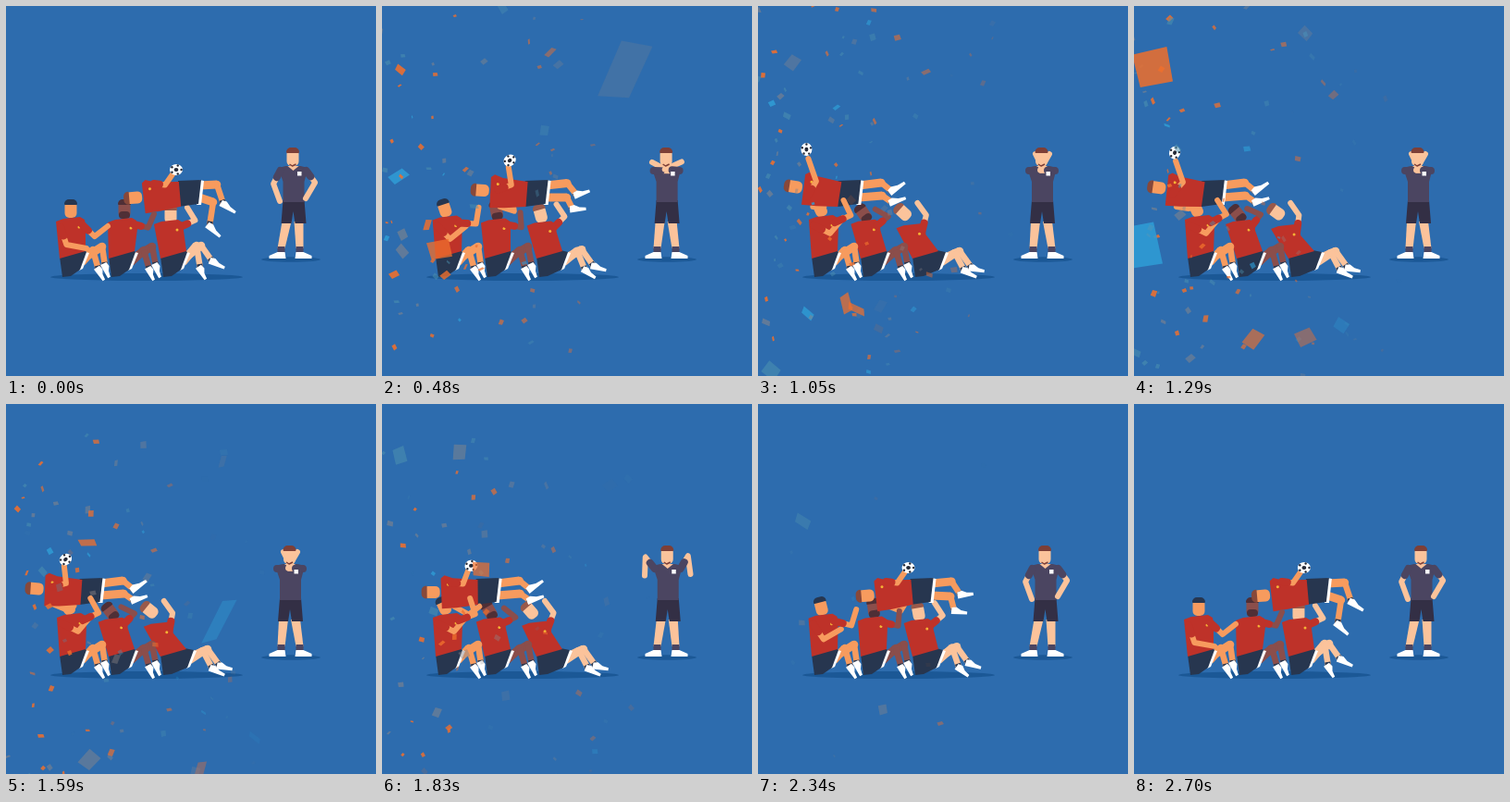
Animation, 400 px wide and 400 px high, one loop 2730 ms. Source, as an HTML page with a canvas:

```html
<!DOCTYPE html>
<html lang="en">
<head>
<meta charset="utf-8">
<title>Team celebration</title>
<style>
  html, body { margin: 0; width: 100%; height: 100%; overflow: hidden; background: #2d6cae; }
  canvas { display: block; width: 400px; height: 400px; }
</style>
</head>
<body>
<canvas id="stage" width="400" height="400"></canvas>
<script>
const ctx = document.getElementById('stage').getContext('2d');
const LOOP = 2730, STEP = 30;
const RED = '#be3229', NAVY = '#27364f', WHITE = '#fff', SHADE = '#1b5896';
const ORANGE = '#f79b5e', PALE = '#fbc39b', BROWN = '#8b4e4b';
const PURPLE = '#4b4561', DARK = '#332f45', YELLOW = '#f5b335', MAROON = '#7d3f37';

const mix = (a, b, k) => a.map((v, i) => v + (b[i] - v) * k);
const ease = (t, from, to) => {
  const u = Math.max(0, Math.min(1, (t - from) / (to - from)));
  return u * u * (3 - 2 * u);
};

function poly(color, ...p) {
  ctx.fillStyle = color;
  ctx.beginPath();
  for (let i = 0; i < p.length; i += 2) ctx.lineTo(p[i], p[i + 1]);
  ctx.fill();
}
function line(color, width, ...p) {
  ctx.strokeStyle = color;
  ctx.lineWidth = width;
  ctx.beginPath();
  for (let i = 0; i < p.length; i += 2) ctx.lineTo(p[i], p[i + 1]);
  ctx.stroke();
}
function oval(color, x, y, rx, ry = rx) {
  ctx.fillStyle = color;
  ctx.beginPath();
  ctx.ellipse(x, y, rx, ry, 0, 0, 7);
  ctx.fill();
}
function box(color, x, y, w, h, r = 0) {
  ctx.fillStyle = color;
  ctx.beginPath();
  ctx.roundRect(x, y, w, h, r);
  ctx.fill();
}
function placed(x, y, degrees, draw) {
  ctx.save();
  ctx.translate(x, y);
  ctx.rotate(degrees * Math.PI / 180);
  draw();
  ctx.restore();
}

function head(x, y, angle, skin, hair, beard) {
  placed(x, y, angle, () => {
    box(skin, -6.5, -9, 13, 18, 5);
    if (beard) box(hair, -6, 2, 12, 8, 4);
    box(hair, -7, -11, 14, 6, [5, 5, 1, 1]);
  });
}
// The elbow follows from the shoulder, the hand and both arm lengths.
function arm(skin, sleeve, sx, sy, hx, hy, upper, lower, side) {
  const reach = Math.hypot(hx - sx, hy - sy);
  const d = Math.max(Math.abs(upper - lower) + .1, Math.min(upper + lower, reach));
  const angle = Math.atan2(hy - sy, hx - sx) +
    side * Math.acos((upper ** 2 + d * d - lower ** 2) / (2 * upper * d));
  const dx = upper * Math.cos(angle), dy = upper * Math.sin(angle);
  ctx.lineCap = 'round';
  line(skin, 6, sx, sy, sx + dx, sy + dy, hx, hy);
  line(sleeve, 8, sx, sy, sx + dx * .5, sy + dy * .5);
  ctx.lineCap = 'butt';
}
function leg(skin, hx, hy, [kx, ky, ax, ay, tx, ty]) {
  line(skin, 9, hx, hy, kx, ky);
  oval(skin, kx, ky, 4.3);
  line(skin, 6.5, kx, ky, ax, ay);
  line(NAVY, 6, kx + (ax - kx) * .8, ky + (ay - ky) * .8, ax, ay);
  const len = Math.hypot(tx - ax, ty - ay);
  placed(ax, ay, Math.atan2(ty - ay, tx - ax) * 180 / Math.PI, () =>
    poly(WHITE, -3, -3, 2, -4, len * .6, -1, len + 2, 0, len + 2, 3, -3, 4));
}

function seated(man, [sx, sy, hx, hy, angle], near, far, thigh) {
  const { hip, skin, hair, beard } = man, end = hip + thigh;
  leg(skin, end - 4, 274, far);
  leg(skin, end - 4, 277, near);
  poly(WHITE, end, 266, end + 4, 267, end - 3, 284, end - 7, 286);
  poly(NAVY, hip, 271, hip + 26, 264, end + 1, 266, end - 6, 285, hip + 12, 292, hip + 3, 293);
  head(hx, hy, angle, skin, hair, beard);
  poly(RED, sx, sy, sx + 8, sy - 3, sx + 26, sy - 5, sx + 31, sy - 2, sx + 32, sy + 7, hip + 28, 265, hip, 273);
  oval(YELLOW, sx + 25, sy + 6, 1.5);
}

const left = { hip: 58, skin: ORANGE, hair: NAVY };
const middle = { hip: 111, skin: BROWN, hair: '#4f2f36', beard: true };
const right = { hip: 167, skin: PALE, hair: '#99594a' };

function ball(x, y, turn) {
  placed(x, y, turn, () => {
    oval(WHITE, 0, 0, 7, 6);
    oval('#242936', 0, 0, 2.4, 2);
    for (let a = 0; a < 6; a += Math.PI * .4)
      oval('#242936', 5.6 * Math.cos(a), 4.8 * Math.sin(a), 1.2);
  });
}

// Lying player, carried to the left and back
function lifted(roll, stretch, lift) {
  const w = 187 - 114 * roll, hem = w + 25;
  const legAt = (from, to) => mix(from, to, stretch).map((v, i) => i % 2 ? v : v + hem);
  const back = stretch * (1 - lift);
  leg(ORANGE, hem - 3, 207, legAt([12, 212, 8, 238, 19, 247], [22, 205, 32, 212, 45, 207]));
  leg(ORANGE, hem - 3, 194, legAt([16, 193, 23, 214, 35, 221], [21, 191, 32, 200, 44, 191]));
  poly(WHITE, hem - 3, 188, hem + 2, 189, hem - 1, 215, hem - 6, 215);
  poly(NAVY, w - 1, 189, hem - 1, 188, hem - 4, 214, w - 1, 217);
  ctx.lineCap = 'round';
  line(ORANGE, 6, w - 28, 217, w - 16 + 8 * back, 217 + 12 * back, w - 26 + 32 * back, 217 + 2 * back);
  ctx.lineCap = 'butt';
  placed(w, 203, 14 * Math.sqrt(lift) - 5, () => {
    head(-49, 0, -90, ORANGE, '#87483a');
    poly(RED, -39, -15, -35, -18, -26, -15, 1, -13, 1, 14, -22, 17, -38, 18);
    oval(YELLOW, -31, -8, 1.5);
  });
  const bx = w - 3 - 32 * lift, by = 177 - 22 * lift;
  arm(ORANGE, RED, w - 27 - 7 * lift, 192 + 14 * lift, bx - 4 + 6 * lift, by + 5 + 5 * lift,
    12 + 7 * lift, 14 + 12 * lift, 1);
  ball(bx, by, -90 * lift);
}

function team(t) {
  const roll = (1 - Math.cos(2 * Math.PI * t / LOOP)) / 2;
  const stretch = 1 - (1 - roll) ** 4;
  const lift = Math.sin(Math.PI * Math.min(1, t / 2040)) ** 2;

  oval(SHADE, 152, 293, 104, 4);
  const a = mix([54, 233, 70, 220, 0], [55, 231, 67, 219, -25], stretch);
  const b = mix([110, 234, 128, 220, 0], [99, 236, 112, 225, -40], roll);
  const c = mix([160, 236, 178, 226, 0], [148, 241, 154, 223, -55], roll);

  arm(PALE, RED, c[0] + 28, c[1] + 3, 196 - 27 * roll, 218 - 5 * stretch, 18, 16, 1);
  seated(right, c,
    mix([206, 259, 210, 284, 216, 293], [213, 267, 223, 286, 235, 291], stretch),
    mix([211, 259, 223, 276, 235, 281], [218, 265, 231, 283, 243, 285], stretch), 28 + 7 * stretch);
  seated(middle, b, [149, 264, 155, 285, 160, 294], [158, 260, 162, 281, 167, 291], 28);
  seated(left, a, [94, 264, 100, 285, 106, 294], [104, 260, 107, 281, 112, 291], 28);
  arm(ORANGE, RED, a[0] + 5, a[1] + 6, ...mix([87, 262], [92, 229], stretch), 20, 22, 1);
  lifted(roll, stretch, lift);
  arm(BROWN, RED, b[0] + 28, b[1] + 2, 160 - 38 * roll, 225 - 6 * roll, 16, 16, 1);
  arm(ORANGE, RED, a[0] + 28, a[1] + 3, 110 - 20 * roll, 238 - 28 * stretch, 19, 18, 1);
}

function coach(t) {
  const raise = ease(t, 150, 600) - ease(t, 1620, 2040);
  const c = 310.5 - 3.5 * raise, swing = 14 * Math.sin(Math.PI * raise);
  oval(SHADE, 308, 274, 32, 2.8);
  for (const side of [-1, 1]) {
    const foot = 307.5 + 10 * side, hip = c - .5 + 6.5 * side;
    poly(PALE, hip - 5, 233, hip + 5, 233, foot + 4, 262, foot - 4, 262);
    box(PURPLE, foot - 4, 260, 8, 7);
    poly(WHITE, foot - 4 * side, 266, foot + 4 * side, 266, foot + 13 * side, 270, foot + 13 * side, 273, foot - 5 * side, 273);
  }
  poly(DARK, c - 11, 210, c + 12, 210, c + 14, 235, c + 2, 235, c, 222, c - 2, 235, c - 13, 235);
  poly(PURPLE, c - 16, 175, c - 8, 173, c + 8, 173, c + 16, 175, c + 12, 190, c + 12, 212, c - 11, 212, c - 11, 190);
  poly(PALE, c - 6, 173, c + 6, 173, c, 178);
  arm(PALE, PURPLE, c - 14, 178, ...mix([296 - swing, 211], [300 - swing, 160], raise), 16, 20, 1);
  arm(PALE, PURPLE, c + 14, 178, ...mix([324 + swing, 208], [315 + swing, 160], raise), 16, 20, -1);
  head(c - .5, 164, 0, PALE, MAROON);
  line(MAROON, 1.5, c - 4, 171, c - 1, 173, c + 3, 171);
  box(WHITE, c + 4.5, 179, 4.5, 4.5);
}

const PAPER = ['#ee6f2d', '#8d8788', '#4d92b0', '#2f9bd4'];
function random(seed) {
  return () => {
    seed = (seed * 16807) % 2147483647;
    return seed / 2147483647;
  };
}
const rnd = random(4711);
const bits = Array.from({ length: 230 }, () => ({
  start: 20 + 1730 * rnd() ** 1.2, life: 600 + 330 * rnd(),
  reach: 15 + 265 * rnd() ** 1.2, y: -70 + 410 * rnd(), fall: .05 + .18 * rnd(),
  size: 1.6 + 2.4 * rnd() + 9 * rnd() ** 12, color: Math.floor(3.3 * rnd() ** 1.6),
  turn: 360 * rnd(), spin: .5 * (rnd() - .5)
}));
// Paper passing close by: time, x, y, size, paper colour, width ratio
const near = [
  [480, 62, 263, 14, 0, .8], [480, 262, 70, 38, 1, .5], [1290, 20, 66, 22, 0, 1],
  [1290, -2, 260, 33, 3, .8], [1590, 230, 235, 30, 3, .25], [2040, 72, 288, 25, 2, .5]];

function paper(x, y, size, turn, ratio, color, alpha) {
  ctx.globalAlpha = Math.max(0, Math.min(1, alpha)) * (color % 3 ? .55 : .9);
  placed(x, y, turn, () =>
    poly(PAPER[color], -size, -size * ratio * .6, size * .7, -size * ratio, size, size * ratio * .7, -size * .6, size * ratio));
  ctx.globalAlpha = 1;
}
const fade = x => 1 - Math.max(0, x / 300) ** 1.5;
function confetti(t) {
  for (const b of bits) {
    const age = t - b.start;
    if (age < 0 || age > b.life) continue;
    const x = -15 + b.reach * (1 - Math.exp(-age / 150)) + age * .03;
    paper(x, b.y + b.start * .04 + age * b.fall, b.size, b.turn + age * b.spin,
      .35 + .5 * Math.abs(Math.sin(b.turn + age / 190)), b.color,
      fade(x) * Math.min(1, (b.life - age) / 150));
  }
  for (const [time, x, y, size, color, ratio] of near) {
    const d = t - time;
    paper(x + d * .12, y + d * .28, size, d * .15 - 60 * (ratio < .6), ratio, color,
      (1 - x / 420) * (1 - Math.abs(d) / 150));
  }
}

function draw() {
  const t = Math.floor(performance.now() % LOOP / STEP) * STEP;
  ctx.fillStyle = '#2d6cae';
  ctx.fillRect(0, 0, 400, 400);
  ctx.lineJoin = 'round';
  coach(t);
  team(t);
  confetti(t);
  requestAnimationFrame(draw);
}
draw();
</script>
</body>
</html>
```
